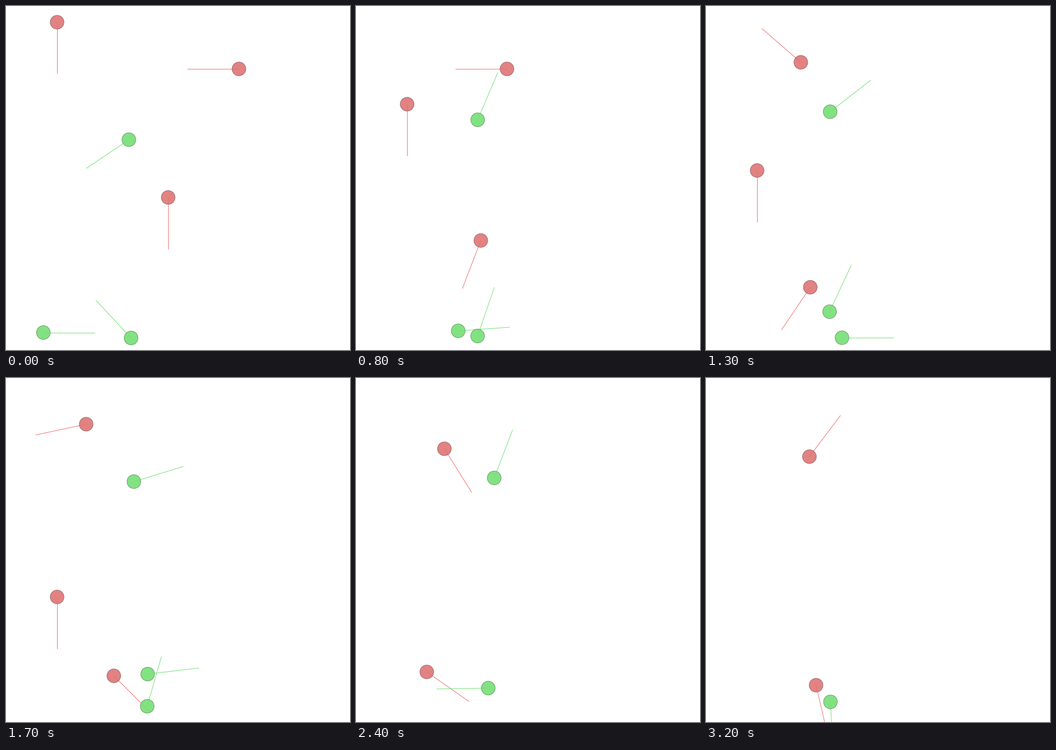
Animation of 700 by 700 pixels, one loop 3.3 s. Source, as a matplotlib script:

```python
import numpy as np
import matplotlib.pyplot as plt
from matplotlib.animation import FuncAnimation
from matplotlib.patches import Circle

SIZE, DPI = 700, 100
FRAMES, INTERVAL = 33, 100
RADIUS, REACH = 14, 105
PX = 72 / DPI
RED = dict(fill="#df7474", line="#ee6464", edge="#8c6060")
GREEN = dict(fill="#74df74", line="#66dc66", edge="#5c8c5c")


def ramp(t, a, b):
    """Smooth 0..1 between steps a and b."""
    u = np.clip((t - a) / (b - a), 0, 1)
    return u * u * (3 - 2 * u)


def after(t, a):
    return max(t - a, 0)


def cruise(t):
    """Distance covered while speeding up to 28 px per step."""
    return 28 * t - 64 * (1 - np.exp(-0.28 * t))


def coast(t, reach=93, drag=0.3):
    """Distance covered while slowing to rest."""
    return reach * (1 - np.exp(-drag * t))


# Each mover returns x, y and its heading in degrees at step t.
def diver(t):
    stop = 20.2
    x = 104 + 10 * after(t, 20)
    y = 33 + cruise(min(t, stop)) + coast(after(t, stop))
    return x, y, 90 - 55 * ramp(t, 20, 24) + 42 * ramp(t, 24, 32)


def runner(t):
    stop = 10.4
    x = 474 - cruise(min(t, stop)) - coast(after(t, stop)) + 4 * after(t, 17)
    y = (128 - 34 * ramp(t, 10, 17) + 50 * ramp(t, 17, 24)
         + 16 * ramp(t, 24, 32))
    turn = (180 + 82 * ramp(t, 11, 15) - 94 * ramp(t, 15, 17)
            + 250 * ramp(t, 17, 24) - 111 * ramp(t, 24, 32))
    return x, y, turn


def faller(t):
    fall = min(t, 13)
    x = 330 - 9.5 * min(t, 12.4) + 1.8 * after(t, 13)
    y = 389.5 + 6 * fall + 0.62 * fall ** 2 + coast(after(t, 13), 38, 0.55)
    turn = (90 + 55 * ramp(t, 0, 4) - 34 * ramp(t, 4, 8)
            + 13 * ramp(t, 8, 13) - 79 * ramp(t, 13, 17))
    return x, y, turn


def drifter(t):
    x = 247 + 0.1 * (t - 5.5) ** 2
    y = 272 - 1.07 * t - 43 * ramp(t, 0, 12)
    turn = (146 + 115 * ramp(t, 0, 4) + 32 * ramp(t, 4, 8)
            + 50 * ramp(t, 8, 17) - 52 * ramp(t, 17, 24)
            + 69 * ramp(t, 24, 30))
    return x, y, turn


def roamer(t):
    stop = 10.8
    x = (76 + 16.5 * min(t, stop) + coast(after(t, stop), 35, 0.47)
         - 20 * ramp(t, 17, 24) - 16 * ramp(t, 24, 32))
    y = (664.5 - 3.5 * ramp(t, 0, 8) + 14 * ramp(t, 8, 13)
         - 7 * ramp(t, 13, 17) - 37 * ramp(t, 17, 24) + 28 * ramp(t, 24, 32))
    turn = (-4 * ramp(t, 0, 8) + 4 * ramp(t, 8, 13) - 74 * ramp(t, 13, 17)
            - 107 * ramp(t, 17, 24) - 26 * ramp(t, 24, 30)
            - 66 * ramp(t, 30, 32))
    return x, y, turn


def climber(t):
    x = (254.5 - 10 * ramp(t, 0, 4) + 7 * ramp(t, 4, 13)
         + 2.3 * after(t, 13) ** 2)
    y = (675.5 - 4 * ramp(t, 0, 8) - 49.5 * ramp(t, 8, 13)
         - 19.5 * ramp(t, 13, 17))
    turn = (227 - 61.5 * ramp(t, 0, 4) - 236.5 * ramp(t, 4, 8)
            + 6 * ramp(t, 8, 13) + 65 * ramp(t, 13, 18))
    return x, y, turn


class Agent:
    """Dot with a heading line, shown up to its last step."""

    def __init__(self, ax, style, move, last=FRAMES):
        self.move, self.last = move, last
        self.line, = ax.plot([], [], color=style["line"], lw=PX,
                             solid_capstyle="butt", zorder=1)
        self.dot = Circle((0, 0), RADIUS, fc=style["fill"], ec=style["edge"],
                          lw=PX, alpha=0.9, zorder=2)
        ax.add_patch(self.dot)

    def draw(self, t):
        x, y, turn = self.move(t)
        a = np.radians(turn)
        self.line.set_data([x, x + REACH * np.cos(a)],
                           [y, y + REACH * np.sin(a)])
        self.dot.center = x, y
        for part in (self.line, self.dot):
            part.set_visible(t <= self.last)
        return self.line, self.dot


fig = plt.figure(figsize=(SIZE / DPI, SIZE / DPI), dpi=DPI, facecolor="white")
ax = fig.add_axes([0, 0, 1, 1])
ax.set_xlim(0, SIZE)
ax.set_ylim(SIZE, 0)
ax.axis("off")

agents = [
    Agent(ax, RED, diver),
    Agent(ax, RED, runner),
    Agent(ax, RED, faller, last=18),
    Agent(ax, GREEN, drifter, last=30),
    Agent(ax, GREEN, roamer),
    Agent(ax, GREEN, climber, last=18),
]


def update(step):
    return [part for agent in agents for part in agent.draw(step)]


anim = FuncAnimation(fig, update, frames=FRAMES, interval=INTERVAL,
                     repeat=True, repeat_delay=0, blit=False)
plt.show()
```
